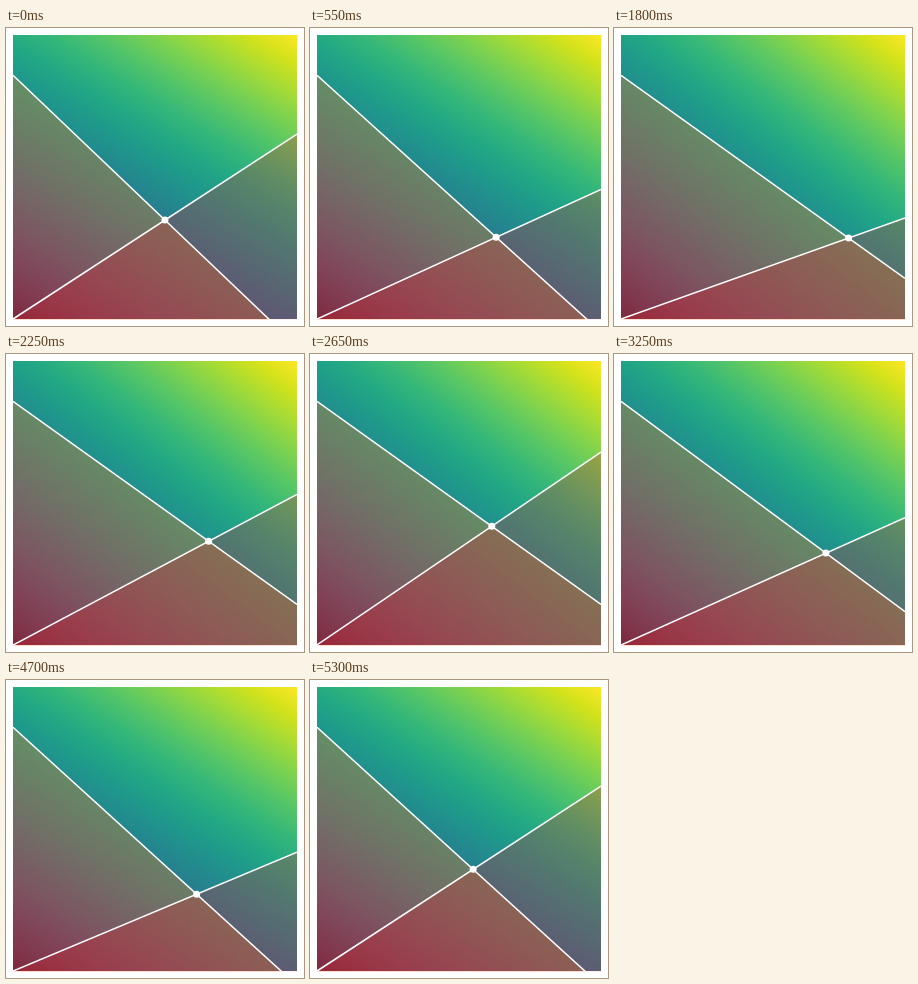
These frames come from a looping animation (298 px wide and 298 px high, 5350 ms). An HTML page with a canvas:

```html
<!DOCTYPE html>
<html lang="en">
<head>
<meta charset="utf-8">
<title>Two constraints</title>
<style>
html, body { margin: 0; width: 100%; height: 100%; overflow: hidden; background: #fff; }
canvas { display: block; width: 298px; height: 298px; }
</style>
</head>
<body>
<canvas id="plot"></canvas>
<script>
const LOOP = 5350, STAGE = 298;
const X0 = 7, Y0 = 7, SIZE = 284, X1 = X0 + SIZE, Y1 = Y0 + SIZE;
const UPPER_Y = 47.3;

const viridis = ['#440154', '#481a6c', '#472f7d', '#414487', '#39568c', '#31688e',
  '#2a788e', '#23888e', '#1f988b', '#22a884', '#35b779', '#54c568', '#7ad151',
  '#a5db36', '#d2e21b', '#fde725'];

// time, slope of the falling line, slope of the rising line
const poses = [
  [0, 0.953, 0.651],
  [1200, 0.852, 0.303],
  [1800, 0.715, 0.3556],
  [2650, 0.715, 0.679],
  [3900, 0.771, 0.2975],
  [4700, 0.909, 0.418],
  [5300, 0.910, 0.651]
];

const canvas = document.getElementById('plot');
const ctx = canvas.getContext('2d');
const dpr = window.devicePixelRatio || 1;
canvas.width = canvas.height = Math.round(STAGE * dpr);
ctx.scale(dpr, dpr);

const mix = (a, b, k) => a + (b - a) * k;
const swing = t => 2.41 - 0.93 * Math.cos(4 * Math.PI * t / LOOP);

function slopesAt(t) {
  let i = 0;
  while (i < poses.length - 2 && t > poses[i + 1][0]) i++;
  const [ta, fallA, riseA] = poses[i];
  const [tb, fallB, riseB] = poses[i + 1];
  const k = Math.min(1, (t - ta) / (tb - ta));
  const fall = 1 / mix(1 / fallA, 1 / fallB, k);
  // the rising line's inverse slope swings twice per loop, with a small drift
  const drift = mix(1 / riseA - swing(ta), 1 / riseB - swing(tb), k);
  const rise = 1 / (swing(Math.min(t, tb)) + drift);
  return { fall, rise };
}

function fillField(share) {
  const up = 1 - share;
  const k = SIZE / (share * share + up * up);
  const g = ctx.createLinearGradient(X0, Y1, X0 + k * share, Y1 - k * up);
  viridis.forEach((c, i) => g.addColorStop(i / (viridis.length - 1), c));
  ctx.fillStyle = g;
  ctx.fillRect(X0, Y0, SIZE, SIZE);
}

function shadeBelow(yLeft, yRight, color) {
  const bottom = Y1 + 0.5;
  ctx.fillStyle = color;
  ctx.beginPath();
  ctx.moveTo(X0, yLeft);
  ctx.lineTo(X1, yRight);
  ctx.lineTo(X1, Math.max(bottom, yRight));
  ctx.lineTo(X0, bottom);
  ctx.fill();
}

function strokeLine(yLeft, yRight) {
  ctx.beginPath();
  ctx.moveTo(X0, yLeft);
  ctx.lineTo(X1, yRight);
  ctx.stroke();
}

function draw(t) {
  const { fall, rise } = slopesAt(t);
  const fallEnd = UPPER_Y + fall * SIZE;
  const riseEnd = Y1 - rise * SIZE;
  const dx = (Y1 - UPPER_Y) / (fall + rise);

  ctx.clearRect(0, 0, STAGE, STAGE);
  ctx.save();
  ctx.beginPath();
  ctx.rect(X0, Y0, SIZE, SIZE + 0.5);
  ctx.clip();
  fillField(0.38 + (0.953 - fall) * 0.2);

  // below the falling line; the steep case leaves through the bottom edge
  ctx.fillStyle = 'rgba(255,127,14,0.31)';
  ctx.beginPath();
  ctx.moveTo(X0, UPPER_Y);
  ctx.lineTo(X1, fallEnd);
  ctx.lineTo(X1, Y1 + 40);
  ctx.lineTo(X0, Y1 + 40);
  ctx.fill();
  shadeBelow(Y1, riseEnd, 'rgba(214,39,40,0.28)');

  ctx.strokeStyle = '#fff';
  ctx.lineWidth = 1.5;
  strokeLine(UPPER_Y, fallEnd);
  strokeLine(Y1, riseEnd);
  ctx.restore();

  ctx.fillStyle = '#fff';
  ctx.beginPath();
  ctx.arc(X0 + dx, UPPER_Y + fall * dx, 3.5, 0, 2 * Math.PI);
  ctx.fill();
}

const start = performance.now();
function tick() {
  draw((performance.now() - start) % LOOP);
  requestAnimationFrame(tick);
}
tick();
</script>
</body>
</html>
```
